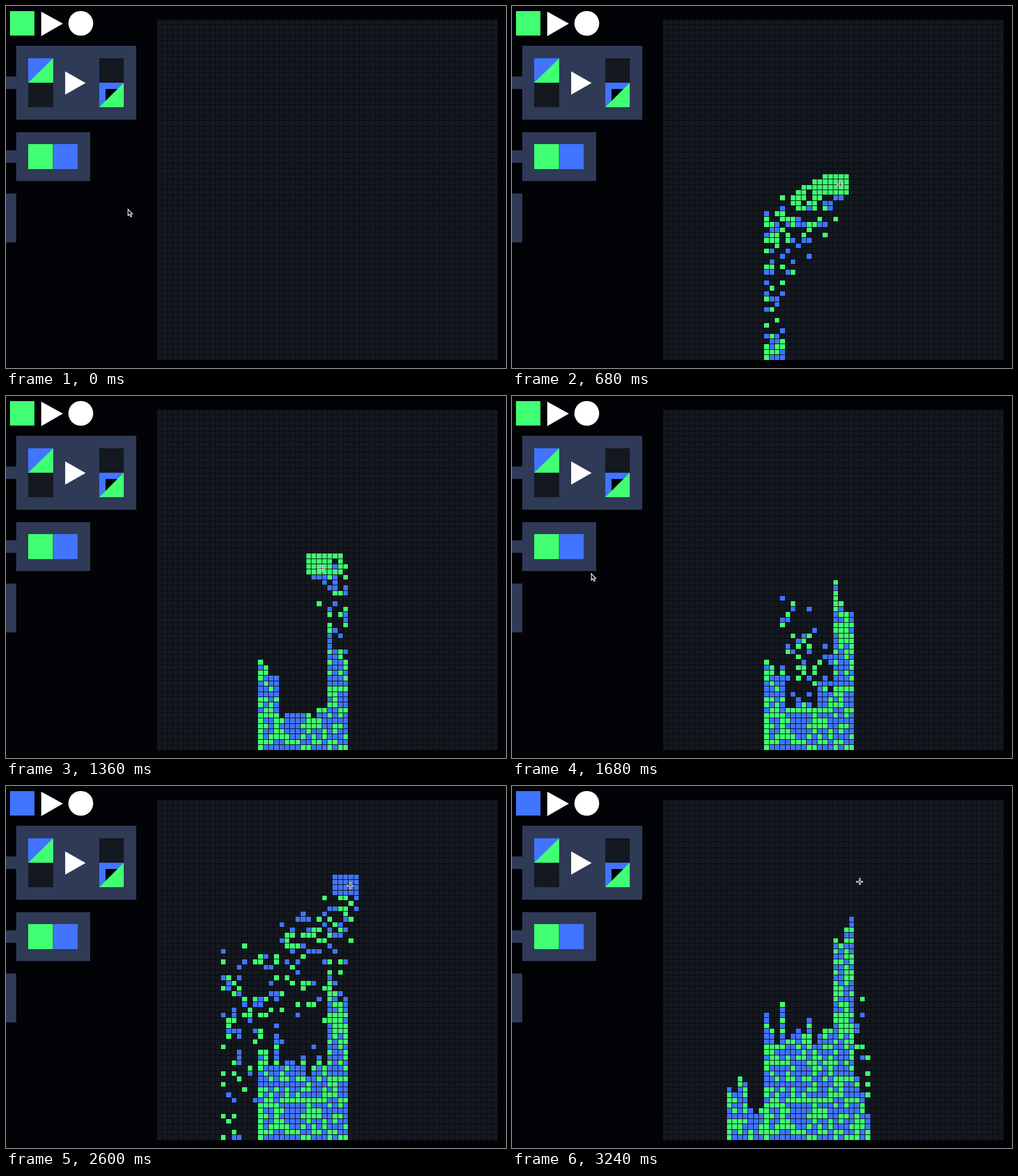
These frames come from a looping animation (879x637 px, 3260 ms). An HTML page with a canvas:

```html
<!DOCTYPE html>
<html>
<head>
<meta charset="utf-8">
<title>Falling cells</title>
<style>
html, body { margin: 0; width: 100%; height: 100%; overflow: hidden; background: #020306; }
canvas { display: block; }
</style>
</head>
<body>
<canvas id="stage" width="879" height="637"></canvas>
<script>
const ctx = document.getElementById('stage').getContext('2d');
const LOOP = 3260, STEP = 20, TICKS = LOOP / STEP;
const N = 64, CELL = 599 / N, LEFT = 264.5, TOP = 23.5;
const BRUSH = 4, SUBSTEPS = 4, FALL_RATE = 2.4; // rate: drops per cell and tick
const GREEN = '#41ff73', BLUE = '#4174ff', DARK = '#14181f', PANEL = '#2f3a56', BACK = '#020306';
const COLORS = [DARK, GREEN, BLUE];
const SWITCH = 1860; // time at which blue is picked

// Pointer path; `down` means the brush paints on the way to this point
const PATH = [
  { t: 0, x: 214, y: 357 },
  { t: 320, x: 465, y: 375 },
  { t: 590, x: 465, y: 375, down: true },
  { t: 680, x: 577, y: 314, down: true },
  { t: 740, x: 592, y: 299, down: true },
  { t: 930, x: 592, y: 299, down: true },
  { t: 1080, x: 592, y: 299 },
  { t: 1290, x: 592, y: 299, down: true },
  { t: 1470, x: 493, y: 310, down: true },
  { t: 1680, x: 139, y: 312 },
  { t: SWITCH, x: 105, y: 262 },
  { t: 2180, x: 400, y: 206 },
  { t: 2310, x: 400, y: 206, down: true },
  { t: 2400, x: 497, y: 206, down: true },
  { t: 2500, x: 590, y: 192, down: true },
  { t: 2640, x: 611, y: 168, down: true },
  { t: 2750, x: 611, y: 168, down: true },
  { t: LOOP, x: 611, y: 168 }
];

function pointer(t) {
  const i = Math.max(1, PATH.findIndex(p => p.t >= t));
  const a = PATH[i - 1], b = PATH[i];
  const k = (t - a.t) / (b.t - a.t);
  return { x: a.x + (b.x - a.x) * k, y: a.y + (b.y - a.y) * k, down: b.down };
}

let seed = 7;
function random() {
  seed = seed + 0x6d2b79f5 | 0;
  let r = Math.imul(seed ^ seed >>> 15, 1 | seed);
  r = r + Math.imul(r ^ r >>> 7, 61 | r) ^ r;
  return ((r ^ r >>> 14) >>> 0) / 4294967296;
}

// Randomly picked cells drop one place and take a random colour
function fall(grid) {
  for (let n = 0; n < N * N * FALL_RATE / SUBSTEPS; n++) {
    const i = Math.floor(random() * N * N), below = i + N;
    if (grid[i] && below < N * N && !grid[below]) {
      grid[below] = random() < 0.5 ? 1 : 2;
      grid[i] = 0;
    }
  }
}

function paint(grid, t) {
  const { x, y, down } = pointer(t);
  if (!down) return;
  const col = Math.floor((x - LEFT) / CELL) - BRUSH / 2;
  const row = Math.floor((y - TOP) / CELL) - BRUSH / 2;
  for (let r = row; r < row + BRUSH; r++) {
    grid.fill(t < SWITCH ? 1 : 2, r * N + col, r * N + col + BRUSH);
  }
}

function simulate() {
  const grid = new Uint8Array(N * N), states = [grid.slice()];
  for (let n = 1; n < TICKS; n++) {
    for (let s = 1; s <= SUBSTEPS; s++) {
      fall(grid);
      paint(grid, (n - 1 + s / SUBSTEPS) * STEP);
    }
    states.push(grid.slice());
  }
  return states;
}

function box(color, x0, y0, x1, y1) {
  ctx.fillStyle = color;
  ctx.fillRect(x0, y0, x1 - x0, y1 - y0);
}

function shape(color, ...points) {
  ctx.beginPath();
  for (const p of points) ctx.lineTo(...p);
  ctx.closePath();
  ctx.fillStyle = color;
  ctx.fill();
}

function drawTools(t) {
  box(t < SWITCH ? GREEN : BLUE, 7, 9, 50, 52);
  shape('#fff', [62, 10], [100, 31], [62, 53]);
  ctx.beginPath();
  ctx.arc(131.5, 30.5, 21.8, 0, Math.PI * 2);
  ctx.fill();

  box(PANEL, 0, 124, 18, 146);
  box(PANEL, 18, 70, 229, 200);
  box(BLUE, 39, 92, 83, 135);
  shape(GREEN, [83, 92], [83, 135], [39, 135]);
  box(DARK, 39, 135, 83, 178);
  shape('#fff', [104, 115], [140, 135.5], [104, 156]);
  box(DARK, 164, 92, 207, 135);
  box(BLUE, 164, 135, 207, 178);
  box(BACK, 175, 146, 197, 168);
  shape(GREEN, [207, 135], [207, 178], [164, 178]);

  box(PANEL, 0, 254, 18, 276);
  box(PANEL, 18, 222, 148, 308);
  box(GREEN, 39, 243, 83, 287);
  box(BLUE, 83, 243, 126, 287);
  box('#26506e', 82.5, 243, 83.5, 287);
  box(PANEL, 0, 330, 18, 416);
}

function drawGrid(grid) {
  box('#080b10', 265, 24, 864, 622);
  for (let i = 0; i < N * N; i++) {
    const c = i % N, r = Math.floor(i / N);
    box(COLORS[grid[i]],
      Math.round(LEFT + c * CELL) + 1, Math.round(TOP + r * CELL) + 1,
      Math.round(LEFT + (c + 1) * CELL), Math.round(TOP + (r + 1) * CELL));
  }
}

function drawPointer(t) {
  const { x, y } = pointer(t);
  ctx.save();
  ctx.translate(Math.round(x), Math.round(y));
  if (x > LEFT) {
    box('#e8eaee', -6, -1, 6, 2);
    box('#e8eaee', -1, -6, 2, 6);
    box('#343a44', -5, 0, 5, 1);
    box('#343a44', 0, -5, 1, 5);
  } else {
    shape('#05060a', [0.5, 0.5], [0.5, 12], [3, 9.5], [5, 14], [7, 13], [5, 9], [8.5, 9]);
    ctx.strokeStyle = '#fff';
    ctx.lineWidth = 1.2;
    ctx.stroke();
  }
  ctx.restore();
}

const states = simulate();

function draw(now) {
  const n = Math.floor(now % LOOP / STEP), t = n * STEP;
  box(BACK, 0, 0, 879, 637);
  drawTools(t);
  drawGrid(states[n]);
  drawPointer(t);
}

const start = performance.now();
function frame() {
  draw(performance.now() - start);
  requestAnimationFrame(frame);
}
frame();
</script>
</body>
</html>
```
